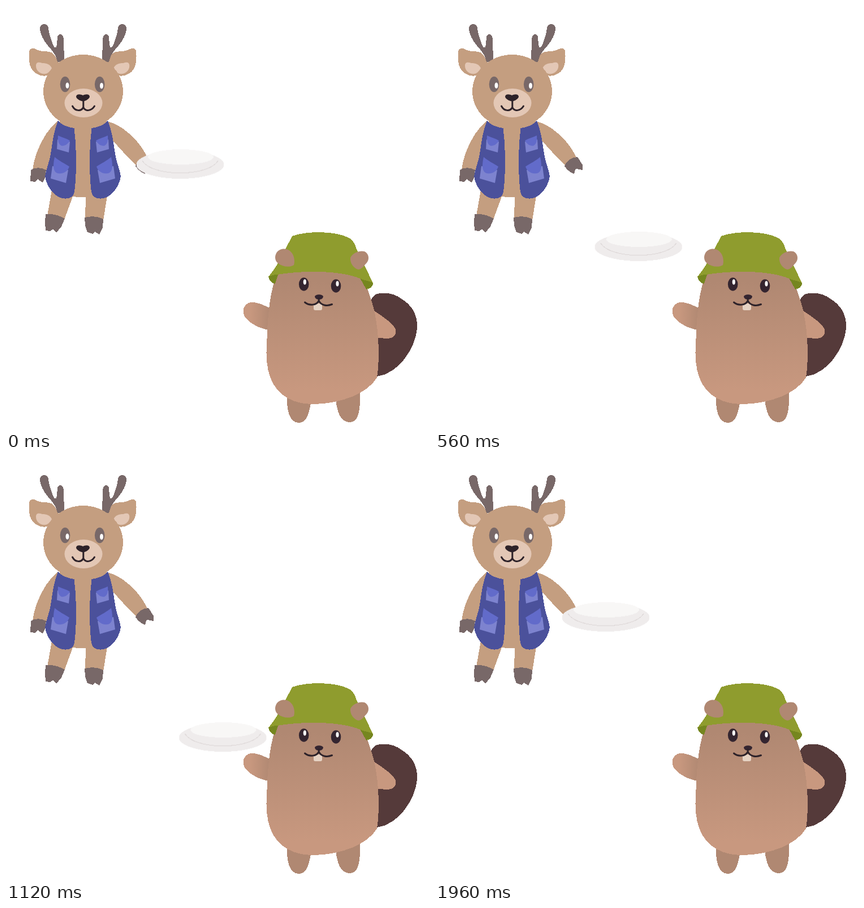
An HTML page without scripts that plays this animation: 748 by 748 pixels, repeating every 2000 ms.

```html
<!DOCTYPE html>
<html lang="en">
<head>
<meta charset="utf-8">
<title>Plate toss</title>
<style>
  html, body { margin: 0; width: 100%; height: 100%; overflow: hidden; background: #fff; }
  svg { display: block; width: 100vw; height: 100vh; }
  .fur { fill: #c49e80; }
  .horn { fill: #786868; }
  .pale { fill: #e3c7b5; }
  .vest { fill: #4b519b; }
  .pocket { fill: #7d83cf; }
  .flap { fill: #626bca; }
  .brown { fill: #b08872; }
  .ink { fill: #342530; }
  .cut { shape-rendering: crispEdges; }
  .line { fill: none; stroke: #2d2229; stroke-width: 3; stroke-linecap: round; stroke-linejoin: round; }
  .plate { animation: toss 2s -1ms infinite; }

  /* 25 positions a second: down to the catch, then back up */
  @keyframes toss {
    0% { transform: translate(308px, 279.5px); animation-timing-function: steps(24); }
    48% { transform: translate(396.7px, 529.1px); animation-timing-function: step-end; }
    50% { transform: translate(395px, 525.6px); animation-timing-function: steps(25); }
    100% { transform: translate(298.1px, 272.6px); }
  }
</style>
</head>
<body>
<svg viewBox="0 0 748 748">
  <defs>
    <linearGradient id="belly" x1="0" y1="0" x2="0" y2="1">
      <stop offset=".1" stop-color="#b08872"/>
      <stop offset=".9" stop-color="#c8987f"/>
    </linearGradient>
    <linearGradient id="sleeve">
      <stop offset=".25" stop-color="#c8987f"/>
      <stop offset="1" stop-color="#b08872"/>
    </linearGradient>

    <g id="ear">
      <path class="fur cut" d="M41 82C41 75 47 73 54 77C66 83 78 77 85 86L96 104L76 122C68 125 60 124 53 119C42 112 40 100 41 82Z"/>
      <path class="pale" d="M53 106C53 99 58 99 64 101C72 101 78 103 81 110C78 115 74 120 68 120C60 120 53 114 53 106Z"/>
    </g>
    <path id="antler" class="horn cut" d="M61 47C58 38 61 32 67 32C72 32 74 34 75 39C76 50 79 57 83 68C86 76 89 75 90 68L91 55C92 48 100 48 102 57L103 99H91C89 90 86 84 80 77C71 67 65 59 61 47Z"/>
    <g id="side">
      <path class="vest cut" d="M92 203C98 210 108 214 120.500 216C125 250 125 300 121 329C119 339 110 342 100 340C85 337 72 320 69 301C70 290 78 275 80 255C83 235 85 220 92 203Z"/>
      <path class="pocket" d="M91 236L113 240L111 259L90 253Z"/>
      <path class="flap" d="M92 229C100 233 107 234 113 238C109 245 103 248 98 247C93 245 91 238 92 229Z"/>
      <path class="pocket" d="M82 283L110 290L106 313L79 305Z"/>
      <path class="flap" d="M86 267C94 274 103 278 112 284C109 293 101 297 92 296C84 294 82 285 86 267Z"/>
    </g>
  </defs>

  <g id="deer">
    <g class="fur cut">
      <path d="M92 203C69 220 50 260 47 291L71 292L90 240Z"/>
      <path d="M180 204C207 211 237 239 250 268L231 282C213 266 200 250 187 236Z"/>
      <path d="M82 320L118 337L103 378L73 371Z"/>
      <path d="M141 337L180 330L172 379L140 376Z"/>
      <path d="M95 200H178V320L151 337Q134 339 117 337L95 320Z"/>
    </g>
    <g class="horn cut">
      <path d="M44 290C50 285 63 285 71 290L69 304L65 312L58 308L56 306L52 311L43 310Z"/>
      <path d="M229 283C232 274 241 267 252 267L261 281V290L250 288L248 289L246 297C238 294 233 289 229 283Z"/>
      <path d="M70 368C82 367 94 370 104 376L98 390L89 401L83 395L78 398L70 397L69 382Z"/>
      <path d="M139 374C150 371 163 372 172 377L171 392L165 404L157 399L154 403L144 400L140 388Z"/>
    </g>
    <use href="#side"/>
    <use href="#side" transform="matrix(-1 0 0 1 272 0)"/>
    <use href="#ear"/>
    <use href="#ear" transform="matrix(-1 0 0 1 271.300 0)"/>
    <use href="#antler"/>
    <use href="#antler" transform="matrix(-1 0 0 1 273 0)"/>
    <ellipse class="fur cut" cx="136.500" cy="151" rx="70.500" ry="65"/>
    <ellipse class="horn" cx="104.500" cy="138.500" rx="8.800" ry="13.800"/>
    <ellipse class="horn" cx="165.700" cy="138.500" rx="8.800" ry="13.800"/>
    <ellipse fill="#fff" cx="108.500" cy="140.500" rx="3" ry="5.300"/>
    <ellipse fill="#fff" cx="169" cy="141" rx="3" ry="5.300"/>
    <ellipse class="pale" cx="137" cy="171.500" rx="33.500" ry="25.500"/>
    <path fill="#2d2229" d="M124 160C125 155 132 156 136 158C140 156 147 155 148 160C148 164 141 168 136.500 168.500C131 168 124 164 124 160Z"/>
    <path class="line" d="M136.800 167V179M117.500 177C122 186 133 187 136.800 179C140 187 151 186 156.500 177"/>
  </g>

  <g id="beaver">
    <g class="cut">
      <path fill="#553a3a" d="M643 523C652 508 655 509 664 508C680 507 690 511 698 517C720 530 728 548 727 570C724 605 695 650 656 655L640 560Z"/>
      <path fill="#c8987f" d="M645 535C668 550 684 561 689 572C691 584 683 588 672 588L650 586Z"/>
      <path fill="url(#sleeve)" d="M468 535C450 526 434 519 424 528C416 537 418 549 430 558C440 565 452 572 468 573Z"/>
      <path class="brown" d="M497 688C496 715 501 737 518 737C533 737 536 718 540 698Z"/>
      <path class="brown" d="M583 696C586 720 592 736 608 736C624 736 627 715 626 680Z"/>
      <path fill="url(#belly)" d="M482 462C470 495 465 525 462.500 565L460.500 612C460 670 487 704 545 704C595 703 640 684 656 657C660 635 660 590 655 560C651 528 640 503 625 462Z"/>
      <path fill="#75861f" d="M464 478C465 487 472 491 476 491L482 472ZM626 481L637 501C643 500 650 497 649 489Z"/>
      <path fill="#8f9c2e" d="M506 407C530 397.500 586 397 608 411C615 416 617 421 620 430L649 490C645 486 638 487 629 483C590 466 520 468 480 475C473 475 468 477 464 479C475 465 485 450 494 430Z"/>
    </g>
    <path class="brown" d="M478 437C483 428 497 427 504 435C510 441 511 452 509 458C501 463 489 461 481 455C475 450 475 443 478 437Z"/>
    <path class="brown" d="M609 445C614 436 625 432 634 434C642 438 643 448 638 454C632 460 630 465 623 466C615 464 608 455 609 445Z"/>
    <ellipse class="ink" cx="526.700" cy="492" rx="8.800" ry="11.800"/>
    <ellipse class="ink" cx="583.500" cy="495" rx="8.800" ry="11.800"/>
    <ellipse fill="#fff" cx="528.300" cy="488" rx="2.600" ry="4.800"/>
    <ellipse fill="#fff" cx="586" cy="491" rx="2.600" ry="4.800"/>
    <path fill="#e5d2c3" d="M544 526H559V535Q559 538 556 538H547Q544 538 544 535Z"/>
    <path class="ink" d="M546 514C547 509 560 509 561 514C560 518 557 519 553.500 519C550 519 547 518 546 514Z"/>
    <path class="line" d="M553.200 517V521M528.500 524C536 530 549 530 553.200 521C557 530 568 531 576.500 527.500"/>
  </g>

  <g class="plate cut">
    <ellipse fill="#efecec" cy="1" rx="77.500" ry="25"/>
    <ellipse fill="#f8f7f6" cx="1" cy="-12.500" rx="58" ry="13.500"/>
    <path fill="none" stroke="#dcd6d6" d="M-67 -6C-50 23 50 23 67 -6"/>
  </g>
</svg>
</body>
</html>
```
